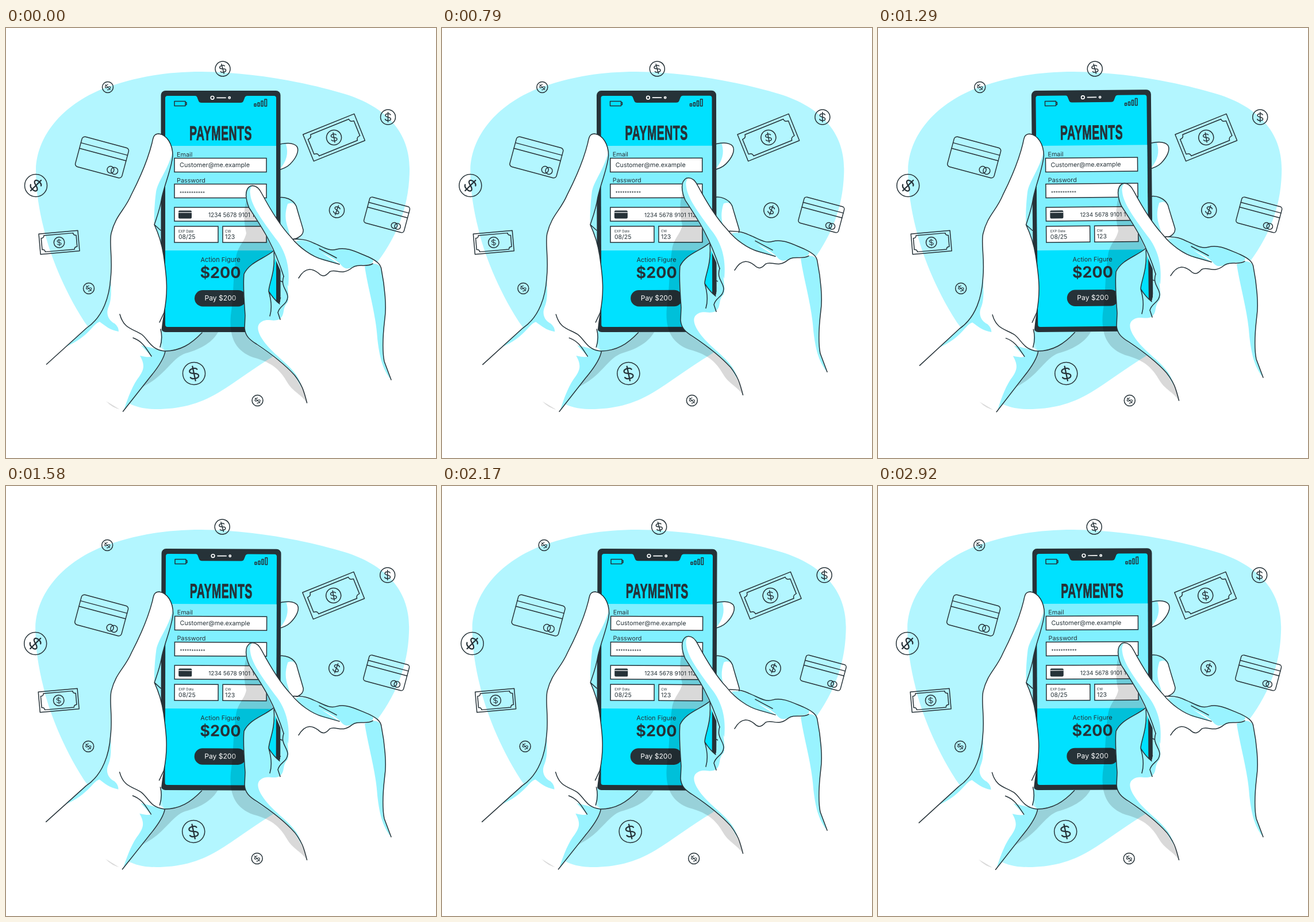
Recreate the animation shown at these times as an HTML page. Size 748 px wide and 748 px high, loop 2960 ms.

```html
<!DOCTYPE html>
<html lang="en">
<head>
<meta charset="utf-8">
<title>Mobile payment</title>
<style>
  html, body { margin: 0; width: 100%; height: 100%; overflow: hidden; background: #fff; }
  svg { display: block; width: 100vw; height: 100vh; }
  text { font-family: Inter, "Open Sans", sans-serif; fill: #263238; }
  .title { font: 700 35px "Liberation Sans", Arial, sans-serif; letter-spacing: 1px; stroke: #263238; stroke-width: 1; }
  .line { fill: none; stroke: #263238; stroke-width: 1.5; stroke-linecap: round; stroke-linejoin: round; }
  .box { fill: #fff; stroke: #263238; stroke-width: 1.5; }
  .dark { fill: #263238; }
  .white { fill: #fff; }
  .cyan { fill: #00e1ff; }
  .tint { fill: #99f3ff; }
  .shade { fill: #000; opacity: .15; }
</style>
</head>
<body>
<svg viewBox="0 0 748 748">
  <g id="backdrop">
    <path fill="#b3f6ff" d="M52 245C54 195 88 140 165 107C220 86 275 76 340 76C430 77 520 94 590 115C660 137 702 180 702 245C702 310 680 365 640 415C590 475 540 520 470 568C430 592 400 616 370 634C335 655 300 663 262 663C240 663 226 659 214 653C180 600 170 555 137 512C100 455 75 390 66 350C56 310 52 280 52 245Z"/>
    <g id="icons" fill="none" stroke="#263238" stroke-linecap="round" stroke-linejoin="round"></g>
  </g>

  <g id="device">
    <!-- palm under the phone and its shadow -->
    <path class="tint" d="M262 520H341V530C322 550 303 562 276 562Z"/>
    <path class="shade" d="M277 562C305 560 325 548 342 529H369C360 545 342 558 312 566C292 573 280 597 255 614C240 624 232 626 226 636Z"/>
    <path class="shade" d="M174 649Q186 656 201 664Q186 662 174 649Z"/>

    <!-- fingers behind the phone -->
    <path class="tint" d="M470 203C485 199 500 199 506 206C511 214 504 227 494 237C488 243 480 246 470 248Z"/>
    <path class="white" d="M487 202C500 199 507 203 508 211C508 221 500 231 490 240L476 246C488 232 492 218 487 202Z"/>
    <path class="line" d="M470 204C485 199 500 199 506 206C511 214 504 227 494 237C488 243 480 246 470 248"/>
    <path class="tint" d="M470 295C485 291 500 299 505 310C510 328 514 340 517 351C518 361 507 367 491 370L470 375Z"/>
    <path class="white" d="M490 306C499 302 504 306 506 315L517 351C518 361 507 367 493 369C497 350 479 340 490 306Z"/>
    <path class="line" d="M470 296C485 291 500 299 505 310C510 328 514 340 517 351C518 361 507 367 491 370"/>
    <path class="tint" d="M470 375L492 400L490 470L470 465Z"/>
    <path class="line" d="M477 440L482 442V468L477 470"/>
    <path class="tint" d="M271 300L258 342L272 380Z"/>

    <!-- phone -->
    <rect class="dark" x="269.5" y="109" width="208" height="420" rx="8"/>
    <path class="cyan" d="M281 118H329Q332 118 333 122L335 127Q336 130 340 130H408Q412 130 413 127L415 122Q416 118 420 118H466Q470 118 470 122V516Q470 520 466 520H281Q277 520 277 516V122Q277 118 281 118Z"/>
    <path fill="#80f0ff" d="M277 205H470V387H277Z"/>
    <g fill="none" stroke="#fff" stroke-width="1.7" stroke-linecap="round">
      <circle cx="359" cy="121.3" r="2.8"/><path d="M367 121.3H382"/><circle cx="388.7" cy="121.3" r="1.6"/>
    </g>
    <path class="line" d="M293 127.5H312V135.5H293ZM312 129.5H314V133.5H312Z"/>
    <path class="line" d="M432 132H435V136H432ZM438 130H441V136H438ZM444 127H447V136H444ZM450 124H453.500V136H450Z"/>
    <text class="title" transform="translate(373.5 194.5) scale(.555 1)" text-anchor="middle">PAYMENTS</text>

    <rect class="box" x="293" y="226.500" width="160" height="24"/>
    <rect class="box" x="293" y="271.500" width="160" height="24"/>
    <rect class="box" x="293" y="312" width="160" height="24"/>
    <rect class="box" x="293" y="345" width="76" height="28"/>
    <rect class="box" x="377" y="345" width="76" height="28"/>
    <rect class="dark" x="300" y="317.500" width="23" height="14" rx="2"/>
    <path class="white" d="M300 320.300H323V321.500H300Z"/>
    <g font-size="10.8">
      <text x="297" y="223.500">Email</text>
      <text x="302" y="242">Customer@me.example</text>
      <text x="297" y="268.500">Password</text>
      <text x="302" y="289.500" font-size="8">***********</text>
      <text x="352" y="329" font-size="10">1234 5678 9101 1121</text>
      <text x="300" y="355.500" font-size="6">EXP Date</text>
      <text x="300" y="367" font-size="10.5">08/25</text>
      <text x="381" y="355.500" font-size="6">CW</text>
      <text x="381" y="367" font-size="10.5">123</text>
    </g>
    <g text-anchor="middle">
      <text x="373" y="407" font-size="11">Action Figure</text>
      <text x="373" y="435" font-size="27" font-weight="700">$200</text>
      <rect class="dark" x="328" y="456" width="90" height="28.500" rx="14.200"/>
      <text x="373" y="474" font-size="12.1" style="fill:#fff">Pay $200</text>
    </g>

    <!-- holding hand -->
    <path class="white" d="M70.500 585L140 522C170 502 180 465 182 435C186 400 179 375 183 357C191 325 206 318 218 290C235 257 247 228 254 200C256 190 257 184 266 184C280 186 290 202 290 222C288 245 277 268 271 295C268 315 262 330 258 342C264 355 271 375 274 395C280 435 282 460 275 495C270 518 270 540 268 555L277 562C275 575 265 590 250 608L203.500 667Z"/>
    <path class="tint" d="M290 214C290 245 277 268 271 295C268 315 262 330 258 342C257 325 259 300 261 285C264 266 283 245 290 214Z"/>
    <path class="tint" d="M182 420C183 460 184 472 178 486C173 499 180 510 189 514Q196 520 196 528C180 525 174 519 163 511C150 515 145 537 103 555L140 522C170 502 180 465 182 435Z"/>
    <path class="tint" d="M235 552C252 556 260 558 277 562C275 575 265 590 250 608L205 665C213 640 221 620 232 606C240 594 242 586 233 570Q250 574 253 571Z"/>
    <path class="line" d="M70.500 585L140 522C170 502 180 465 182 435C186 400 179 375 183 357C191 325 206 318 218 290C235 257 247 228 254 200C256 190 257 184 266 184C280 186 290 202 290 222C288 245 277 268 271 295C268 315 262 330 258 342C264 355 271 375 274 395C280 435 282 460 275 495L267 512M258 342L269 352"/>
    <path class="line" d="M198 498C205 524 221 523 236 533C248 542 252 560 276 562C303 562 322 550 341 530M277 562C275 575 265 590 250 608L203.500 667M221 539C238 545 244 558 253 571M268 555Q273 540 269 524"/>
  </g>

  <g id="pointer">
    <path class="shade" d="M419 297C412 318 414 340 418 357C414 374 403 379 400 400C394 440 397 460 391 500C388 535 397 561 430 573C465 582 478 597 489 616C499 633 512 636 523.500 652C520 634 513 623 500 602C481 581 457 566 435 551L416 530L413 428L465 388Z"/>
    <path class="white" fill-rule="evenodd" d="M523.500 652C518 630 515 621 502 604C483 583 460 566 436 550C423 542 416 535 415 522L416 500C414 470 412 448 414 428C424 407 448 402 465 388C454 360 437 336 423 313C417 299 414 281 425 275C435 272 441 280 445 288C461 318 480 347 495 363C509 374 520 367 535 374C552 381 562 389 575 385C593 380 610 390 630 398C645 405 652 411 653 420C659 450 662 485 659 505C656 530 654 560 658 580L670 612ZM468 400C466 425 458 445 457 458C462 466 468 474 476 480C481 465 480 445 482 432Z"/>
    <g class="tint">
      <path fill-rule="evenodd" d="M465 388C448 402 424 407 414 428C412 448 414 470 416 500L415 522C416 535 423 542 436 550C460 566 483 583 502 604L514 625C509 595 475 577 454 552C442 538 433 521 442 513C454 503 462 512 475 507C487 499 479 488 490 477C494 463 487 447 490 437ZM468 400C466 425 458 445 457 458C462 466 468 474 476 480C481 465 480 445 482 432Z"/>
      <path d="M428 275C412 277 416 301 423 313C443 344 465 375 483 432L491 450C494 420 489 394 472 370C452 343 427 311 425 290Q423 280 428 275Z"/>
      <path d="M504 371C520 367 534 374 546 389L580 411L552 404C528 395 512 383 504 371Z"/>
      <path d="M517 370C550 374 560 389 575 385C600 380 620 394 638 402Q642 410 626 412C602 412 594 427 582 411C565 394 538 390 517 370Z"/>
      <path d="M624 415Q642 405 651 415C660 450 662 485 659 505C656 530 654 560 658 580L670 612C653 592 649 565 646 540C643 495 630 455 624 415Z"/>
    </g>
    <path class="line" d="M523.500 652C518 630 515 621 502 604C483 583 460 566 436 550C423 542 416 535 415 522L416 500C414 470 412 448 414 428C424 407 448 402 465 388M483 432C465 375 443 344 423 313C417 299 414 281 425 275C435 272 441 280 445 288C461 318 480 347 495 363C509 381 532 398 552 403L580 411M500 367C520 367 526 370 535 374C552 381 562 389 575 385C593 380 610 390 630 398C645 405 652 411 653 420C659 450 662 485 659 505C656 530 654 560 658 580L670 612"/>
    <path class="line" d="M509 435C522 413 535 420 543 426C551 434 556 432 563 424C574 418 584 432 602 417C613 409 627 417 638 410M545 384L575 400M466 390C469 425 457 445 457 458C462 475 463 488 459 501M457 458C462 466 468 474 476 480M483 432C477 450 490 456 490 468C489 482 476 482 473 495L477 507"/>
  </g>
</svg>
<script>
const byId = id => document.getElementById(id);
const place = (x, y, angle, scale, body) =>
  `<g transform="translate(${x} ${y}) rotate(${angle}) scale(${scale})" stroke-width="${1.5 / scale}">${body}</g>`;

const dollar = '<path stroke-width="1.5" d="M4.500 -4C3 -6.800 -4.600 -6.500 -4.600 -3C-4.600 .7 4.800 -.8 4.800 3.200C4.800 7 -3.700 6.800 -5 3.600M0 -8.500V8.500"/>';
const coin = '<circle r="13"/>' + dollar;
const note = '<path d="M-48 -25H48V25H-48ZM-36 -20H36Q36 -14 43 -14V14Q36 14 36 20H-36Q-36 14 -43 14V-14Q-36 -14 -36 -20Z"/><circle r="13"/>';
const card = '<rect x="-42" y="-27" width="84" height="54" rx="5"/><path d="M-42 -15H42M-42 -5H42"/><circle cx="20" cy="17" r="6"/><circle cx="27" cy="17" r="6"/>';

const coins = [
  [377, 71, -15, 1], [177, 103, -45, .73], [664.5, 155, 0, 1], [52, 274, 45, 1.5],
  [575.5, 317, 20, 1], [144, 453, -45, .73], [327, 601, -12, 1.5], [437.5, 648, -45, .73]
];
byId('icons').innerHTML =
  coins.map(c => place(...c, coin)).join('') +
  place(570.5, 190.5, -22, 1, note) + place(570.5, 190.5, -10, 1, dollar) +
  place(92.5, 373, -5, .71, note + dollar) +
  place(167, 225, 15, 1, card) + place(662.5, 325, 15, .86, card);

// Linear interpolation over [phase, value] stops.
function keyframes(stops, phase) {
  const i = stops.findIndex(([at]) => at > phase);
  const [p0, v0] = stops[i - 1], [p1, v1] = stops[i];
  return v0 + (v1 - v0) * (phase - p0) / (p1 - p0);
}
const shake = [0, -1, 2, -4, 4, -4, 4, -4, 2, -1, 0].map((v, i) => [i / 10, v * 1.496]);
const sway = [[0, 0], [.25, 1], [.75, -1], [1, 0]];
const tap = [[0, 0], [.5, -14.5], [1, 0]];

const LOOP = 2960, CYCLE = 1.5, FPS = 24;

function render(ms) {
  const seconds = Math.floor((ms % LOOP + 5) * FPS / 1000) / FPS;
  const phase = seconds % CYCLE / CYCLE;
  byId('backdrop').setAttribute('transform', `translate(${keyframes(shake, phase)} 0)`);
  byId('device').setAttribute('transform', `rotate(${keyframes(sway, phase)} 289 388)`);
  byId('pointer').setAttribute('transform', `translate(0 ${keyframes(tap, phase)})`);
}

const start = performance.now();
function tick() {
  render(performance.now() - start);
  requestAnimationFrame(tick);
}
tick();
</script>
</body>
</html>
```
